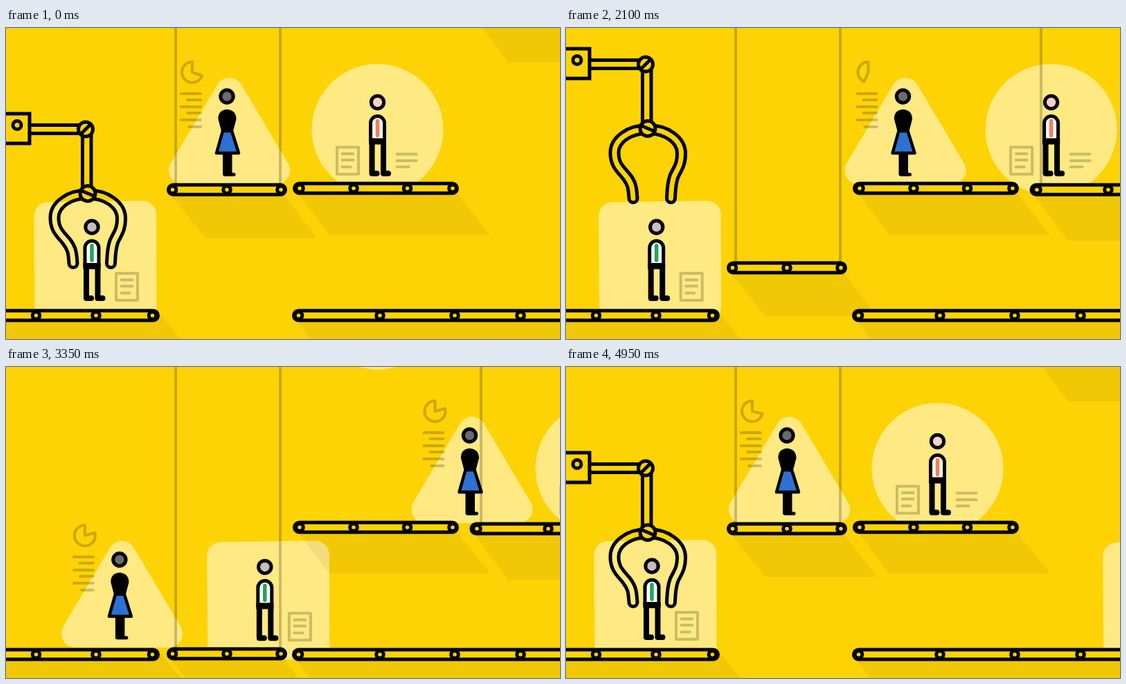
Recreate the animation shown at these times as an HTML page. Size 800 by 450 pixels, loop 5000 ms.

```html
<!DOCTYPE html>
<html lang="en">
<head>
<meta charset="utf-8">
<title>Sorting line</title>
<style>
  html, body { margin: 0; width: 100%; height: 100%; overflow: hidden; background: #fdd305; }
  svg { display: block; width: 800px; height: 450px; }
  .ink { fill: #fdd305; stroke: #000; stroke-width: 5; }
  .glass { fill: #fff; stroke: #fff; stroke-width: 40; stroke-linejoin: round; opacity: .5; }
  .icon { fill: none; stroke: #000; stroke-width: 4; stroke-linecap: round; stroke-linejoin: round; opacity: .2; }
  .leg { fill: none; stroke: #000; stroke-width: 8; stroke-linecap: round; stroke-linejoin: round; }
  .shade { fill: #000; opacity: .05; }
  .rope { stroke: #000; stroke-width: 4; opacity: .2; }
  mask path { fill: none; stroke: #fff; stroke-width: 17; stroke-linecap: round; }
  mask path + path { stroke: #000; stroke-width: 7; }
</style>
</head>
<body>
<svg id="stage" viewBox="0 0 800 450"></svg>
<script>
const LOOP = 5000, STEP = 50;

// ---- drawing helpers ----
const circle = (x, y, r, attrs = 'class="ink"') => `<circle cx="${x}" cy="${y}" r="${r}" ${attrs}/>`;
const group = (id, body) => `<g id="${id}">${body}</g>`;
const rope = (x, y) => `<path class="rope" d="M${x} -500V${y}"/>`;
const shade = points => `<polygon class="shade" points="${points}"/>`;
const head = skin => circle(0, 0, 9.2, `fill="${skin}" stroke="#000" stroke-width="5"`);

const belt = (x1, x2, y, wheels) =>
  `<rect class="ink" x="${x1}" y="${y - 7}" width="${x2 - x1}" height="14" rx="7"/>` +
  wheels.map(x => circle(x, y, 5.3)).join('');

const doc = (x, y) => `<path class="icon" transform="translate(${x} ${y})"
  d="M-15.5 -19.5H15.5V19.5H-15.5ZM-8 -10H8M-8 -1H8M-8 9H4"/>`;

// Figures have their origin at the middle of the head.
const man = (skin, tie) => `
  <path d="M-10 55V30a10 10 0 0 1 20 0V55Z" fill="#fff" stroke="#000" stroke-width="5"/>
  <path d="M0 27V48" stroke="${tie}" stroke-width="5.5" stroke-linecap="round"/>
  <path d="M-12.5 52h25v9h-25z"/>
  <path class="leg" d="M-8 56V103H-1M8.5 56V103H15.500"/>` + head(skin);

const squareMan = id => group(id,
  '<path class="glass" d="M-63.5 -16L73 -18L73.5 114H-62.5Z"/>' +
  doc(50.5, 86.5) + man('#c9bcbd', '#1fa55c'));

const roundMan = id => group(id,
  circle(0, 39.5, 95, 'fill="#fff" opacity=".5"') + doc(-43, 84.5) +
  '<path class="icon" d="M28 75H56M28 84.5H56M28 93.5H45"/>' + man('#f9cfca', '#f57d56'));

const woman = id => group(id, `
  <path class="glass" d="M3.5 -7L71 107H-64Z"/>
  <path class="icon pie"/>
  <path class="icon" d="M-66 -4H-38M-57 5H-38M-66 15H-38M-57 24H-38M-66 34H-38M-55 44H-38"/>
  <path d="M-8 50L-12.5 33C-14 14 14 14 13.5 33L9 50Z"/>
  <path d="M-6 50H7L17 82H-15Z" fill="#2c72d2" stroke="#000" stroke-width="4.5" stroke-linejoin="round"/>
  <path d="M-6 82H7.5V114H-6Z"/>
  <path d="M-3 113H10" stroke="#000" stroke-width="5" stroke-linecap="round"/>` + head('#6b6b6b'));

// A jaw is only an outline: a wide stroke with a narrower one cut out.
const jawMask = (id, d) => `<mask id="${id}" maskUnits="userSpaceOnUse"
  x="-80" y="-20" width="160" height="140"><path d="${d}"/><path d="${d}"/></mask>`;
const jaw = side => `<rect class="${side}" x="-80" y="-20" width="160" height="140" mask="url(#${side})"/>`;

// Claw origin is the hub that joins both jaws.
const claw = (id, top, arm = '') => group(id, arm +
  `<path class="ink" d="M-7.5 ${top}H5V0H-7.5Z"/>` + jaw('left') + jaw('right') +
  circle(0, 0, 11) + '<path class="ink" d="M-9 -4L10 4"/>' +
  circle(-3, top, 10.5) + `<path class="ink" d="M-10 ${top + 7}L4 ${top - 7}"/>`);

const arm = `<path class="ink" d="M-90 -99H-3V-87H-90Z"/>
  <path class="ink" d="M-140 -115.5H-84V-72.5H-140Z"/>` + circle(-102, -99, 6);

const thumb = id => group(id, circle(0, 0, 35.5, 'fill="#3bbc70"') + `
  <path fill="#fff" d="M-21.5 -5H-9.5V15.5H-21.5ZM-6.5 -5C2 -9 1.5 -15 1.5 -22
    C3 -27 9 -23 8.5 -17C8.5 -13 6 -11 6.5 -9H17C24 -9 24 -3 21 -1.5C24.5 0 23 5 20 5.5
    C22.5 8 20.5 11.5 18 11.5C18 14 16 15 13 15H2C-2 15 -3 13 -6.5 13Z"/>`);

const stage = document.getElementById('stage');
stage.innerHTML =
  jawMask('left', 'M0 1C-28 1 -48 17 -48 35C-48 52 -40 58 -31 69C-22 80 -22 88 -21 101') +
  jawMask('right', 'M0 1C28 1 48 17 48.5 35C49 52 43 58 38 69C34 80 34 90 33.5 101') +
  squareMan('squareA') + squareMan('squareB') +
  roundMan('roundA') + roundMan('roundB') +
  woman('womanA') + woman('womanB') +
  shade('-20,424 220,416 225,416 252,450 -20,450') +
  shade('418,422 820,422 820,450 440,450') +
  shade('422,240 467,299 699,299 652,240') +
  group('liftBack', shade('238,8 288,70 449,70 402,8') + rope(245, -8) + rope(396, -8)) +
  group('hoistBack', shade('676,8 725,74 860,74 860,8') + rope(686, -8)) +
  belt(-20, 219.5, 416, [43.5, 130, 211.5]) +
  belt(416.5, 651.5, 232, [424, 502, 579.5, 645]) +
  belt(415.5, 830, 416, [422.5, 540, 648, 743]) +
  group('lift', belt(234.5, 403.5, 0, [240.5, 319, 397])) +
  group('hoist', belt(672, 860, 0, [680, 783])) +
  claw('clawA', -93, arm) + claw('clawB', -400) +
  thumb('thumbA') + thumb('thumbB');

const el = id => document.getElementById(id);
const pies = document.querySelectorAll('.pie');
const place = (id, x, y, scale = 1) =>
  el(id).setAttribute('transform', `translate(${x} ${y}) scale(${scale})`);

// ---- motion rules ----
const clamp = p => Math.max(0, Math.min(1, p));
const smooth = p => p * p * (3 - 2 * p);
const easeOut = p => 1 - (1 - p) ** 2;
const easeIn = p => p ** 3;
const phase = (t, from, to, ease = smooth) => ease(clamp((t - from) / (to - from)));
const pop = (t, show, hide) => phase(t, show, show + 150) - phase(t, hide, hide + 150);

// Distance rolled from rest, nearing the given speed with time constant lag.
const roll = (t, speed, lag) => {
  const s = Math.max(0, t);
  return speed * (s - lag * (1 - Math.exp(-s / lag)));
};

function piePath(gap) {
  const r = 15;
  return `M-50 -35V${-35 - r}A${r} ${r} 0 ${gap < Math.PI ? 1 : 0} 0 ` +
    `${-50 + r * Math.sin(gap)} ${-35 - r * Math.cos(gap)}Z`;
}

function moveClaw(id, x, y, open) {
  place(id, x, y);
  el(id).querySelector('.left').setAttribute('transform', `rotate(${14 * open})`);
  el(id).querySelector('.right').setAttribute('transform', `rotate(${-8 * open})`);
}

function draw(t) {
  // Platforms, each with a small overshoot
  const liftY = 234 + 181 * phase(t, 1400, 2600) - 195 * phase(t, 3610, 4380) + 14 * phase(t, 4380, 4650);
  const leave = 258 * phase(t, 3800, 4320);
  const hoistY = -24 + 267 * phase(t, 385, 1100) - 9 * phase(t, 1100, 1350) - leave;
  for (const id of ['lift', 'liftBack']) place(id, 0, liftY);
  for (const id of ['hoist', 'hoistBack']) place(id, 0, hoistY);

  // Men
  const squareX = 124 + roll(t - 1910, .328, 820);
  const squareY = 288 + 2 * clamp((squareX - 124) / 375);
  const drop = 430 * phase(t, 3850, 4800, easeOut) - 430;
  const lower = 250 * phase(t, 3250, 4015) - 250;
  place('squareA', squareX, squareY);
  place('squareB', 124, t < 3850 ? -500 : 288 + drop);
  place('roundA', 536.5 + 40.5 * (t / 800) ** 1.45, 107.5);
  place('roundB', 536.5, 107.5 + lower);

  // Women
  place('womanA', 319 + roll(t, .18, 1600), 99 - leave);
  const womanX = 319 - roll(4300 - t, .258, 380);
  const womanY = 278 + (liftY - 135 - 278) * clamp((womanX - 140) / 60);
  place('womanB', womanX, womanY);
  const gap = 2.4 + 1.6 * Math.cos(2 * Math.PI * (t - 1500) / LOOP);
  for (const pie of pies) pie.setAttribute('d', piePath(gap));

  // Claws
  const rise = 6 * phase(t, 1450, 2100) - 100 * phase(t, 350, 1250) - 270 * phase(t, 2500, 3300, easeIn);
  moveClaw('clawA', 118, 239.5 + (t < 3850 ? rise : drop), phase(t, 100, 450) - phase(t, 600, 1150));
  moveClaw('clawB', 532, 61 + lower - 173 * phase(t, 4130, 4650), phase(t, 4020, 4300));

  // Approval badges
  place('thumbA', squareX + 59.5, squareY - 10.5, pop(t, 2650, 3150));
  place('thumbB', womanX + 67.5, womanY + 4.5, pop(t, 3550, 4500));
}

function frame() {
  const t = performance.now() % LOOP;
  draw(Math.floor(t / STEP) * STEP);
  requestAnimationFrame(frame);
}
frame();
</script>
</body>
</html>
```
